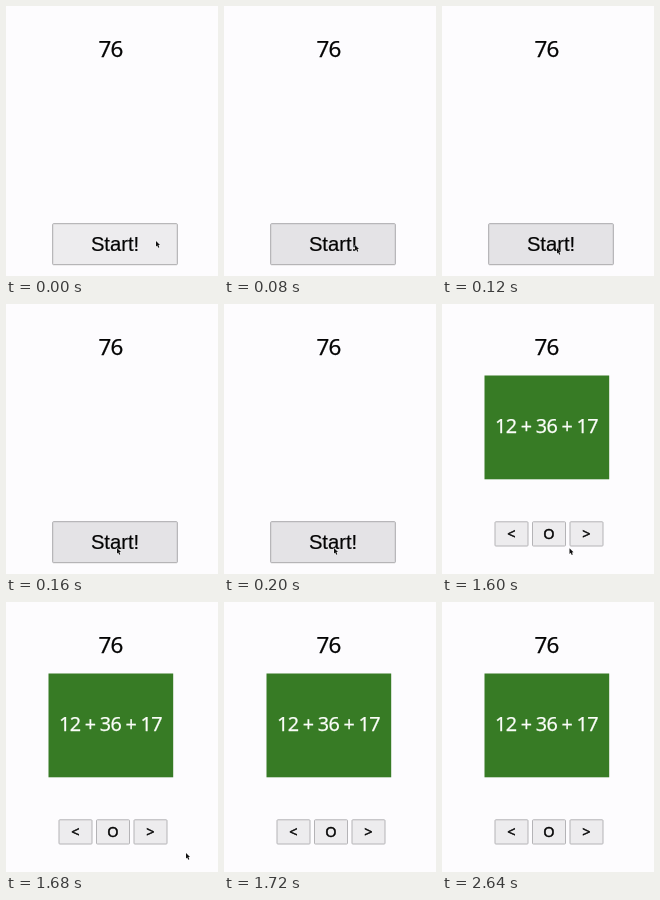
An HTML page with a canvas for the animation above (2800 ms loop, 212x270 px).

```html
<!DOCTYPE html>
<html lang="en">
<head>
<meta charset="utf-8">
<title>Mental arithmetic</title>
<style>
html, body { margin: 0; width: 100%; height: 100%; overflow: hidden; background: #fdfcfe; }
canvas { display: block; width: 212px; height: 270px; }
</style>
</head>
<body>
<canvas id="stage"></canvas>
<script>
const W = 212, H = 270, LOOP = 2800;
const PRESS = 1520, REVEAL = 1600;
const canvas = document.getElementById('stage');
const ctx = canvas.getContext('2d');
const ratio = window.devicePixelRatio || 1;
canvas.width = Math.round(W * ratio);
canvas.height = Math.round(H * ratio);

const SANS = '"Noto Sans", sans-serif';
const ARIAL = '"Liberation Sans", Arial, sans-serif';
const INK = '#050505';

// Pointer tip: start time, x, y
const pointer = [
  [0, 150, 235],
  [80, 131, 239],
  [120, 115, 242],
  [160, 111, 244],
  [200, 110, 244],
  [REVEAL, 127.5, 244.3],
  [1680, 180, 251],
  [1720, null, null]
];

// A thin outline gives the strokes a little extra weight
function text(str, x, y, size, family, color, { spacing = 0, weight = 0 } = {}) {
  ctx.font = `${size}px ${family}`;
  ctx.letterSpacing = `${spacing * size}px`;
  ctx.textAlign = 'center';
  ctx.textBaseline = 'alphabetic';
  ctx.fillStyle = ctx.strokeStyle = color;
  ctx.fillText(str, x, y);
  if (weight) {
    ctx.lineWidth = weight;
    ctx.lineJoin = 'round';
    ctx.strokeText(str, x, y);
  }
}

function button(x, y, w, h, fill, border) {
  ctx.beginPath();
  ctx.roundRect(x + 0.5, y + 0.5, w - 1, h - 1, 0.8);
  ctx.fillStyle = fill;
  ctx.fill();
  ctx.strokeStyle = border;
  ctx.lineWidth = 1;
  ctx.stroke();
}

function drawPointer(t) {
  const [, x, y] = pointer.filter(p => p[0] <= t).pop();
  if (x === null) return;
  ctx.save();
  ctx.translate(x, y);
  ctx.beginPath();
  ctx.moveTo(0, 0);
  ctx.lineTo(0, 5.6);
  ctx.lineTo(1.3, 4.5);
  ctx.lineTo(2.2, 6.8);
  ctx.lineTo(3.3, 6.3);
  ctx.lineTo(2.4, 4.1);
  ctx.lineTo(4, 4);
  ctx.closePath();
  ctx.lineWidth = 1;
  ctx.strokeStyle = 'rgba(255,255,255,0.7)';
  ctx.stroke();
  ctx.fillStyle = '#111';
  ctx.fill();
  ctx.restore();
}

function drawStart(t) {
  const pressed = t >= PRESS;
  const fill = pressed ? '#f5f4f6' : t >= 80 ? '#e4e3e6' : '#edecee';
  button(46.2, 217.2, 125.6, 42, fill, pressed ? '#c3c2c5' : '#a9a8ab');
  text('Start!', 109, 245, 20.2, ARIAL, INK, { weight: 0.2 });
}

function drawCard() {
  ctx.fillStyle = '#377b25';
  ctx.fillRect(42.5, 71.5, 124.7, 103.8);
  text('12 + 36 + 17', 104.4, 129.2, 19.8, SANS, '#fbfdf9', { spacing: -0.035, weight: 0.25 });
  ['<', 'O', '>'].forEach((label, i) => {
    const x = 52.5 + 37.5 * i;
    button(x, 217.3, 34, 25.2, '#edecee', '#b4b3b6');
    text(label, x + 17, 235, 14.5, SANS, INK, { weight: 0.45 });
  });
}

function draw(t) {
  ctx.setTransform(ratio, 0, 0, ratio, 0, 0);
  ctx.fillStyle = '#fdfcfe';
  ctx.fillRect(0, 0, W, H);
  text('76', 104.4, 51.3, 22.4, SANS, INK, { spacing: -0.035, weight: 0.25 });
  if (t < REVEAL) drawStart(t);
  else drawCard();
  drawPointer(t);
}

const began = performance.now();
function tick() {
  draw((performance.now() - began) % LOOP);
  requestAnimationFrame(tick);
}
tick();
</script>
</body>
</html>
```
